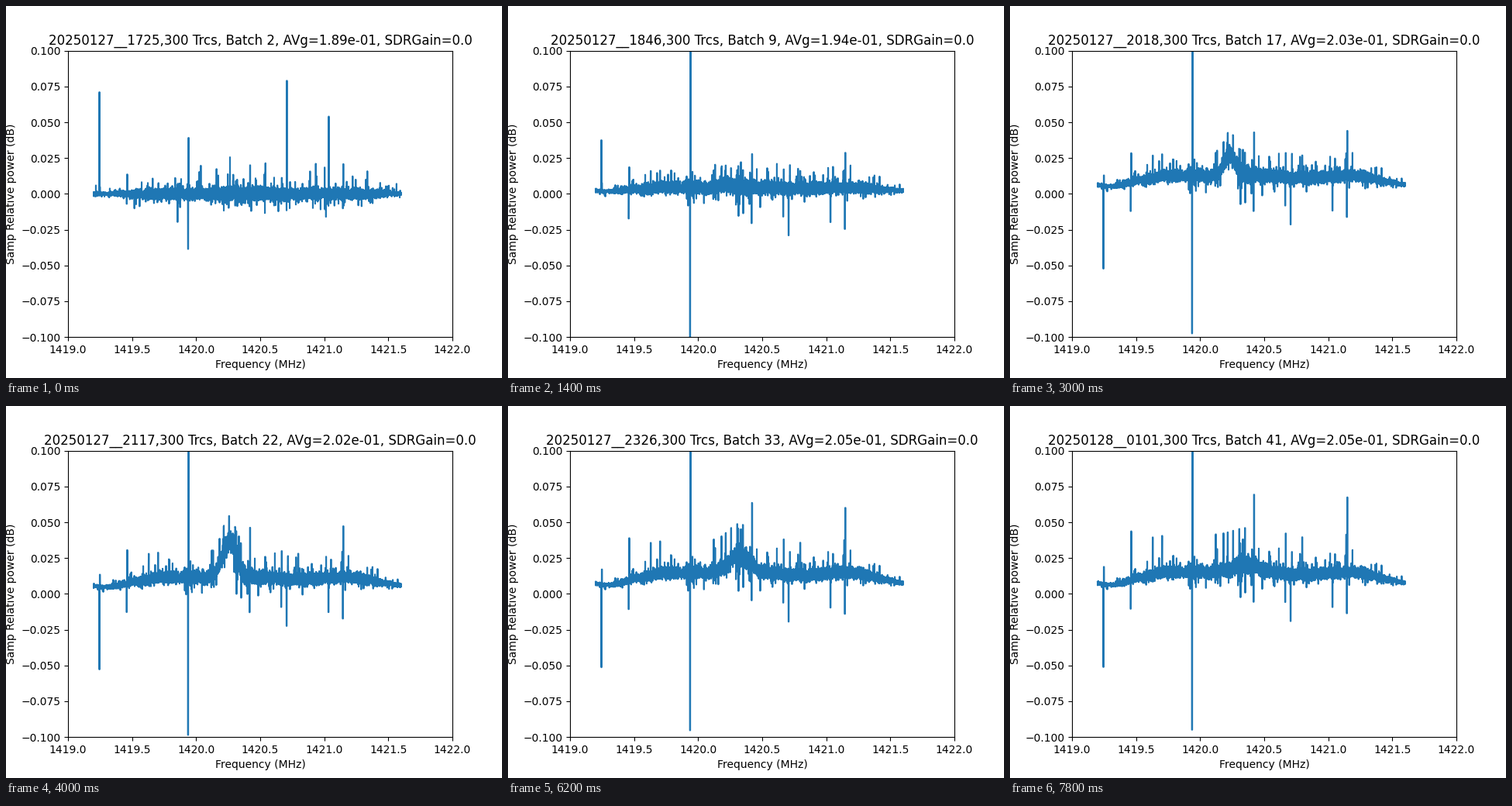
These frames come from a looping animation (640 px wide and 480 px high, 8 s). A matplotlib script:

```python
import numpy as np
import matplotlib.pyplot as plt
from matplotlib.animation import FuncAnimation

FRAMES, STEP = 40, 200
N = 8192
FIRST = 2  # number of the opening batch

offset = np.linspace(.2, 2.6, N)  # MHz above 1419
rng = np.random.default_rng(21)

# Narrow interference: MHz, depth below and final height above the band
SPIKES = [(.247, -58, 12), (.460, -20, 34), (.939, -110, 230),
          (1.419, -25, 50), (1.666, -20, 28), (1.708, -33, 0),
          (2.035, -24, 0), (2.147, -29, 52)]
WEAK = [.63, .703, 1.122, 1.182, 1.215, 1.257, 1.305, 1.35, 1.797, 2.14]
# Peaks that only the first batches have: MHz, height, batch they are gone by
OPENING = [(.245, 71, 10), (1.708, 79, 4), (2.035, 54, 4)]


def curve(points, span):
    """Rounded curve through (MHz, value) points."""
    x, y = zip(*points)
    pad = np.pad(np.interp(offset, x, y), span // 2, mode="edge")
    return np.convolve(pad, np.ones(span) / span, "same")[span // 2:-(span // 2)]


passband = curve([(.2, .12), (.3, 0), (.36, 0), (.5, .5), (.7, .9), (1.4, 1),
                  (1.8, .75), (2.2, 1), (2.45, .45), (2.6, .12)], 440)
spread = curve([(.2, .35), (.3, .23), (.4, .45), (.7, .95), (1.1, 1),
                (1.3, 1.25), (1.9, .95), (2.3, .9), (2.45, .5),
                (2.6, .28)], 240)


def grain(up, down):
    """Dense noise with sparse outliers of the given mean lengths."""
    noise = rng.normal(0, 1.9, N)
    hit = rng.random(N) < .035
    rise = rng.random(N) < .5
    reach = 2.5 + rng.exponential(np.where(rise, up, down))
    return noise + hit * np.where(rise, 1, -1) * np.minimum(reach, 4.5 * up)


steady = grain(3, 3)
early = grain(5.5, 2.8)


def mean_power(batch):
    return np.interp(batch, [2, 5, 12, 17, 26, 33, 41],
                     [0, 3, 6, 14, 13, 16, 16])


def near(mhz):
    return np.abs(offset - mhz) < .0015


def spectrum(batch):
    """Relative power over the band."""
    start = np.clip((5 - batch) / 3, 0, 1)
    growth = .4 + .6 * np.clip((batch - 5) / 36, 0, 1)

    # The emission line swells, drifts up and widens
    amp = 4 + 22 * np.exp(-((batch - 24) / 8.5) ** 2)
    amp *= np.clip((batch - 3) / 9, 0, 1)
    centre = 1.22 + .0055 * max(batch - 15, 0)
    width = .028 + .0025 * max(batch - 12, 0)
    line = amp * np.exp(-((offset - centre) / width) ** 2 / 2)

    mean = mean_power(batch) - .06 * amp
    base = mean * (.4 + .6 * passband) + line
    fresh = np.random.default_rng(500 + batch).normal(0, .5, N)
    noise = steady * (1 - start) + early * start + fresh
    level = base + spread * noise * (1 + line / 60)

    def spike(mhz, height):
        level[near(mhz)] = (base + height)[near(mhz)]

    if start < 1:
        for mhz in WEAK:
            spike(mhz, 26 * growth * (1 - start))
    for mhz, low, high in SPIKES:
        spike(mhz - .002, low * (1 - .65 * start))
        if high:
            spike(mhz + .002, high * (growth if high < 100 else 1 - .83 * start))
    for mhz, height, end in OPENING:
        if batch < end:
            spike(mhz, height * min(1, (end - batch) / 2))
    return level / 1000


def heading(batch):
    n = batch - FIRST
    day, minutes = divmod(int(1045.7 + 11.45 * n + .0062 * n * n), 1440)
    clock = f"{minutes // 60:02d}{minutes % 60:02d}"
    average = 1.89 + mean_power(batch) / 100
    return (f"{20250127 + day}__{clock},300 Trcs, Batch {batch}, "
            f"AVg={average:.2f}e-01, SDRGain=0.0")


fig, ax = plt.subplots(figsize=(6.4, 4.8), dpi=100)
trace, = ax.plot(1419 + offset, spectrum(FIRST))
ax.set_xlim(1419, 1422)
ax.set_ylim(-.1, .1)
ax.set_xlabel("Frequency (MHz)")
ax.set_ylabel("Samp Relative power (dB)")
title = ax.set_title(heading(FIRST))


def draw(frame):
    batch = FIRST + frame
    trace.set_ydata(spectrum(batch))
    title.set_text(heading(batch))
    return trace, title


anim = FuncAnimation(fig, draw, frames=FRAMES, interval=STEP, repeat=True,
                     repeat_delay=0, blit=False)
plt.show()
```
